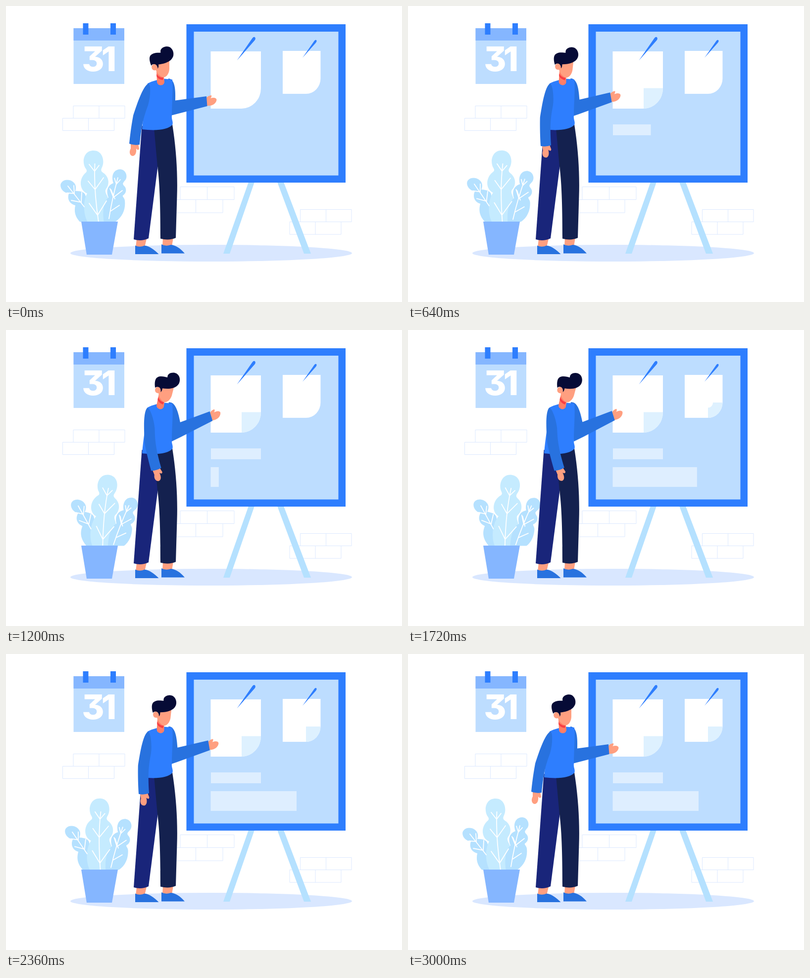
An HTML page for the animation above (3080 ms loop, 800 px wide and 600 px high).

```html
<!DOCTYPE html>
<html lang="en">
<head>
<meta charset="utf-8">
<title>Presenter at the board</title>
<style>
  html, body { margin: 0; width: 100%; height: 100%; overflow: hidden; background: #fff; }
  svg { display: block; width: 800px; height: 600px; }
  .blue { fill: #2e7efe; }
  .sleeve { fill: #2872df; }
  .skin { fill: #ff9f80; }
  .pale { fill: #bdddff; }
  .mid { fill: #85b6ff; }
  .leaf { fill: #b5e1ff; }
  .bricks { fill: none; stroke: #dce9ff; }
  .veins { fill: none; stroke: #fff; stroke-width: 1.8; stroke-linecap: round; }
  .bar { fill: #deeeff; }
  .fold { fill: #def1ff; }
  text { font: 800 69px Inter, "Open Sans", sans-serif; font-feature-settings: "cv09"; fill: #fff; text-anchor: middle; }
</style>
</head>
<body>
<svg viewBox="0 0 800 600">
  <clipPath id="abovePot"><path d="M90 270H290V437.500H90Z"/></clipPath>

  <path class="bricks" d="M136 202.500H240V227.500H136ZM188 202.500V227.500M114.500 227.500H218.500V252.500H114.500ZM166.500 227.500V252.500"/>
  <path class="bricks" d="M352 366.500H461V392.500H352ZM406.500 366.500V392.500M329 392.500H438V419H329ZM383.500 392.500V419"/>
  <path class="bricks" d="M594.500 412.500H698V437.500H594.500ZM646.500 412.500V437.500M573 437.500H677V463H573ZM625 437.500V463"/>
  <ellipse cx="414.500" cy="501" rx="284.500" ry="17" fill="#d9e7ff"/>

  <!-- calendar -->
  <path class="pale" d="M136.500 45H239V158H136.500Z"/>
  <path class="mid" d="M136.500 45H239V70H136.500Z"/>
  <path class="blue" d="M155.500 35H166.500V58H155.500ZM211 35H222V58H211Z"/>
  <text y="132"><tspan x="176">3</tspan><tspan x="208">1</tspan></text>

  <!-- plant -->
  <g clip-path="url(#abovePot)">
    <g id="plant">
      <path class="leaf" d="M154 442C140 430 137 418 140 404C128 401 123 391 127 380C112 378 107 364 112 358C117 351 129 351 136 357C142 362 142 369 140 375C149 375 160 376 161 386L178 442Z"/>
      <path fill="#c5ebff" d="M170 445C156 430 154 396 164 380C148 374 146 350 162 337C164 334 163 332 160 328C153 315 157 293 177 293C195 293 200 314 194 327C190 335 194 336 199 340C210 350 208 364 202 371C198 377 205 383 207 392C210 410 206 430 200 445Z"/>
      <path class="leaf" d="M199 445C194 420 196 398 207 388C201 374 206 363 217 359C212 346 216 331 231 331C243 332 247 347 240 354C236 359 235 360 238 364C245 370 243 380 236 384C235 387 239 388 240 394C242 412 236 432 212 442Z"/>
      <path class="veins" d="M187 438Q177 370 179.500 320M168 400L185 424L203 395M166 355L180 372L197 348M168 321L179 335L188 323"/>
      <path class="veins" d="M125 365L158 407M137 364L138 380L123 379M153 378L152 398L132 394"/>
      <path class="veins" d="M208 431C212 405 216 385 226 348M219 349L223 361L231 352M210 370L217 388L235 374M212 372L220 391M211 416L229 404"/>
    </g>
  </g>
  <path class="mid" d="M152 437H226L214 504H163Z"/>

  <!-- board -->
  <path class="leaf" d="M490 357H502L452 502H439ZM548 357H561L616 502H602Z"/>
  <path class="blue" d="M364.500 37H686V358H364.500Z"/>
  <path class="pale" d="M379.500 52H671.500V343.500H379.500Z"/>
  <path fill="#fff" d="M413.500 92H515V166.500A39 41.500 0 0 1 476 208H413.500ZM559 91H635.500V147A29.500 31 0 0 1 606 178H559Z"/>
  <path class="fold" id="fold1"/>
  <path class="fold" id="fold2"/>
  <path class="blue" d="M466.500 110.500L497.500 65.500Q500 61.500 503 63.500Q505 66 502.500 69.500ZM599 105L623 70.500Q625.500 67.500 627.500 70Q628 72 626 74.500Z"/>
  <rect class="bar" id="bar1" x="414" y="240" height="22"/>
  <rect class="bar" id="bar2" x="413.500" y="278" height="40"/>

  <!-- presenter -->
  <g id="farArm">
    <path class="skin" d="M404 187C407 183 411 181 415 181Q416 184 413 187C419 185 425 186 425.500 190C425 197 417 204 405 202Z"/>
    <path class="sleeve" d="M328 147C340 148 343 165 342 191.500L405 183L406.500 203L337 221L316 226Z"/>
  </g>
  <path class="skin" d="M264 472H284L280 489H262ZM317 470H338L335 487H316Z"/>
  <path class="sleeve" d="M261 485.500V503H308.500C300 494 290 487 280 485.500Q270 490 261 485.500ZM314 483V501.500H361C352 491 343 485 333 484Q323 488 314 483Z"/>
  <path fill="#19257a" d="M274.500 243H306L306 330L288 471Q273 478 258 473Z"/>
  <path fill="#14214f" d="M299 247L336 240C344 290 347 340 345.500 385L343 470Q329 476 312 471.500C312 420 311 360 306 325Z"/>
  <path class="blue" d="M286 157C296 152 307 149 320 147.500L336 149C338 170 335 195 335 222C334 230 338 234 336.500 240C328 252 300 253 275 250C277 222 283 190 286 157Z"/>
  <g id="head">
    <path fill="#ff7e66" d="M304 132L319 144L320 155Q318 161 312 160.500Q306 160 305 154Z"/>
    <path fill="#f83e44" d="M304 138Q310 146 318 145L317 150Q308 149 304.500 143Z"/>
    <path class="skin" d="M302 114L330 108V128C329 140 322 145.500 317 144.500C310 142 304 135 303 130C297 132 293 127 294.500 121Z"/>
    <path fill="#060b36" d="M293.500 121C290 113 288 103 293 99C299 94 307 95 312.500 94.500C310 87 318 82 325 82C335 82 340 93 338 101C335 112 322 117 308 118.500Q309 123 306.500 127Q306 120 301 118Q296 117 293.500 121Z"/>
  </g>
  <g id="nearArm">
    <path class="skin" d="M252 279H267L269 289Q268 293 265 291L263 289C264 298 261 304 256 304C250 303 248 296 252 289Z"/>
    <path class="sleeve" d="M288 157C293 160 292 184 287 201C281 218 274 235 270 281Q259 283 249 279C251 258 254 238 257 222C263 204 276 162 288 157Z"/>
  </g>
</svg>
<script>
const LOOP = 3080, STEP = 40, SWING = 3000;
const el = id => document.getElementById(id);

const smooth = u => {
  u = Math.min(1, Math.max(0, u));
  return u * u * (3 - 2 * u);
};

const turn = (id, angle, x, y) =>
  el(id).setAttribute("transform", `rotate(${angle} ${x} ${y})`);

// A quarter ellipse whose missing inner part shrinks into the corner.
function fold(id, x, y, w, h, p) {
  const a = w * (1 - p), b = h * (1 - p);
  el(id).setAttribute("d", p > 0
    ? `M${x} ${y + h}V${y + b}A${a} ${b} 0 0 0 ${x + a} ${y}H${x + w}A${w} ${h} 0 0 1 ${x} ${y + h}Z`
    : "");
}

function draw(t) {
  const s = smooth(1 - Math.abs(Math.min(t, SWING) * 2 / SWING - 1));
  turn("head", 16 * s, 313, 150);
  turn("nearArm", -23.7 * s, 288, 164);
  turn("farArm", -14 * s, 326, 144);
  turn("plant", 10.3 * s, 188, 490);

  const grow = (start, span) => smooth((t - start) / span);
  fold("fold1", 476, 166.5, 39, 41.5, grow(0, 560));
  fold("fold2", 606, 147, 29.5, 31, grow(1380, 560));
  el("bar1").setAttribute("width", 101 * grow(300, 500));
  el("bar2").setAttribute("width", 173.5 * grow(1065, 712));
}

const begin = performance.now();
function tick() {
  const t = (performance.now() - begin) % LOOP;
  draw(Math.floor(t / STEP) * STEP);
  requestAnimationFrame(tick);
}
tick();
</script>
</body>
</html>
```
